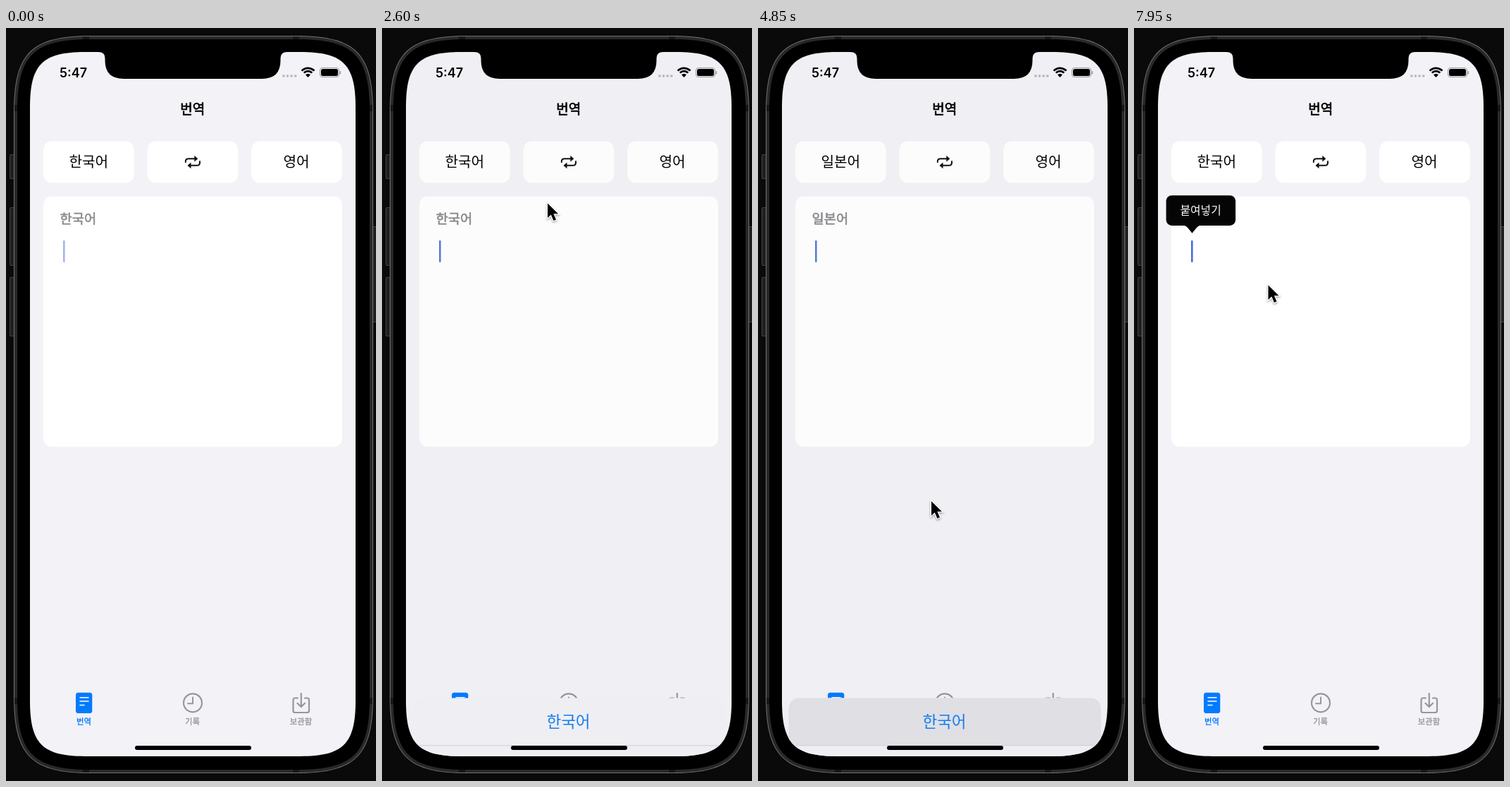
An HTML page with a canvas that plays this animation: 525 px wide and 1067 px high, repeating every 8 s.

```html
<!DOCTYPE html>
<html lang="ko">
<head>
<meta charset="utf-8">
<title>번역</title>
<style>
html, body { margin: 0; width: 100%; height: 100%; overflow: hidden; background: #0a0a0a; }
canvas { display: block; width: 525px; height: 1067px; }
</style>
</head>
<body>
<canvas id="stage" width="525" height="1067"></canvas>
<script>
const ctx = document.getElementById('stage').getContext('2d');
const LOOP = 8000, STEP = 50;
const HANGUL = '"Noto Sans CJK KR", "Noto Sans CJK", sans-serif';
const LATIN = 'Inter, sans-serif';
const BLUE = '#007aff', GRAY = '#96969b', INK = '#000';
const ROWS = ['한국어', '영어', '일본어', '중국어'];
const ROW_HEIGHT = 67.8, SHEET_TOP = 645;

const dialogs = [
  { open: 1250, close: 2500, pick: 2 },
  { open: 3550, close: 4750, pick: 0 }
];
const moves = [
  { from: 450, to: 850, x: 85, y: 190 },
  { from: 1700, to: 1750, x: 216, y: 612 },
  { from: 1750, to: 2400, x: 212, y: 808 },
  { from: 2500, to: 2600, x: 234, y: 246 },
  { from: 2600, to: 3250, x: 104, y: 180 },
  { from: 3700, to: 4250, x: 235, y: 720 },
  { from: 4250, to: 4600, x: 245, y: 668 },
  { from: 4900, to: 5400, x: 295, y: 250 },
  { from: 5400, to: 5700, x: 264, y: 185 },
  { from: 7050, to: 7600, x: 189.5, y: 362 }
];

const clamp = v => Math.max(0, Math.min(1, v));
const smooth = p => p * p * (3 - 2 * p);
const within = (t, from, to) => t >= from && t < to;

function mouseAt(t) {
  let x = -10, y = 215;
  for (const move of moves) {
    const p = smooth(clamp((t - move.from) / (move.to - move.from)));
    x += (move.x - x) * p;
    y += (move.y - y) * p;
  }
  return [x, y];
}

// The sheet settles exponentially and leaves with growing speed.
function sheetOffset({ open, close }, t) {
  return t < close
    ? 123.5 * 0.18 ** ((t - open) / STEP)
    : 47 * ((t - close) / STEP + 1) ** 1.7;
}

// The caret blinks from the start, and anew after each dialog.
function caretAlpha(t) {
  if (dialogs.some(d => within(t, d.open, d.close + 50))) return 0;
  const last = dialogs.filter(d => t >= d.close).pop();
  const since = last ? t - last.close - 60 : t + 377;
  return clamp(0.5 + 1.2 * Math.sin(since / 755 * Math.PI * 2));
}

function box(x, y, w, h, r, color) {
  ctx.beginPath();
  ctx.roundRect(x, y, w, h, r);
  ctx.fillStyle = color;
  ctx.fill();
}

function squircle(x, y, w, h, r) {
  const e = r * 1.4, k = e * 0.225, right = x + w, bottom = y + h;
  const path = new Path2D();
  path.moveTo(x, y + e);
  path.bezierCurveTo(x, y + k, x + k, y, x + e, y);
  path.lineTo(right - e, y);
  path.bezierCurveTo(right - k, y, right, y + k, right, y + e);
  path.lineTo(right, bottom - e);
  path.bezierCurveTo(right, bottom - k, right - k, bottom, right - e, bottom);
  path.lineTo(x + e, bottom);
  path.bezierCurveTo(x + k, bottom, x, bottom - k, x, bottom - e);
  path.closePath();
  return path;
}

function fill(path, color) {
  ctx.fillStyle = color;
  ctx.fill(new Path2D(path));
}

function stroke(path, color, width) {
  ctx.strokeStyle = color;
  ctx.lineWidth = width;
  ctx.lineCap = ctx.lineJoin = 'round';
  ctx.stroke(new Path2D(path));
}

function text(str, x, cy, size, color, { align = 'center', heavy = 0 } = {}) {
  ctx.font = `400 ${size}px ${HANGUL}`;
  ctx.textAlign = align;
  ctx.fillStyle = ctx.strokeStyle = color;
  ctx.fillText(str, x, cy + size * 0.375);
  if (heavy) {
    ctx.lineWidth = heavy;
    ctx.lineJoin = 'round';
    ctx.strokeText(str, x, cy + size * 0.375);
  }
}

function drawPhone() {
  ctx.fillStyle = '#0a0a0a';
  ctx.fillRect(0, 0, 525, 1067);
  for (const [x, y, h] of [[5, 179, 35], [5, 254, 83], [5, 353, 84], [519, 281, 136]]) {
    box(x, y, 8, h, 2, '#424242');
    box(x + 1, y + 1, 6, h - 2, 1, '#202020');
  }
  fill(squircle(11, 11, 510, 1045, 78), '#727272');
  fill(squircle(12, 12, 508, 1043, 77), '#292929');
  ctx.fillStyle = '#171717';
  for (const x of [109, 407]) for (const y of [12, 1050]) ctx.fillRect(x, y, 9, 5);
  for (const x of [12, 515]) for (const y of [109, 949]) ctx.fillRect(x, y, 5, 9);
  fill(squircle(16, 16, 500, 1035, 73), INK);
}

function drawStatus() {
  ctx.font = `600 18px ${LATIN}`;
  ctx.textAlign = 'left';
  ctx.fillStyle = INK;
  ctx.fillText('5:47', 76, 69.6);
  for (let i = 0; i < 4; i++) box(392 + i * 5.6, 66, 3.8, 3.8, 1.9, '#bdbdc2');
  ctx.strokeStyle = INK;
  ctx.lineCap = 'butt';
  ctx.lineWidth = 2.7;
  for (const r of [12.2, 7.8]) {
    ctx.beginPath();
    ctx.arc(428.5, 69, r, -Math.PI * 0.76, -Math.PI * 0.24);
    ctx.stroke();
  }
  fill('M428.5 70L425 66.2Q428.5 63.2 432 66.2Z', INK);
  ctx.beginPath();
  ctx.roundRect(445.5, 56.5, 27, 13, 4);
  ctx.strokeStyle = '#9a9a9f';
  ctx.lineWidth = 1.1;
  ctx.stroke();
  box(447, 58, 24, 10, 2.5, INK);
  box(473.5, 61, 1.6, 4.5, 1, '#9a9a9f');
}

function drawTabs() {
  box(99, 941.7, 23.3, 29.3, 3.5, BLUE);
  stroke('M105 948.7H117M105 954H117M105 959.5H111', '#fff', 1.6);
  ctx.beginPath();
  ctx.arc(265, 956.3, 13, 0, Math.PI * 2);
  ctx.strokeStyle = GRAY;
  ctx.lineWidth = 2.2;
  ctx.stroke();
  stroke('M265 948.5V957.3H258', GRAY, 2);
  stroke('M414 949.5H410Q407.5 949.5 407.5 952V967.5Q407.5 970 410 970H427.5Q430 970 430 967.5V952Q430 949.5 427.5 949.5H424', GRAY, 2.2);
  stroke('M418.8 943V961.5M413.5 956.8L418.8 962L424 956.8', GRAY, 2.2);
  text('번역', 110.5, 983, 11.4, BLUE, { heavy: 0.3 });
  text('기록', 264.5, 983, 11.4, GRAY, { heavy: 0.3 });
  text('보관함', 418.5, 983, 11.4, GRAY, { heavy: 0.3 });
}

function drawApp(t) {
  const swapped = within(t, 5900, 6800);
  const pressed = within(t, 5850, 5950) || within(t, 6750, 6850);
  const picked = dialogs.filter(d => t >= d.close + 200).pop();
  const chosen = ROWS[picked ? picked.pick : 0];
  const [source, result] = swapped ? ['영어', chosen] : [chosen, '영어'];

  ctx.fillStyle = '#f2f2f7';
  ctx.fillRect(34, 34, 462, 998);
  drawStatus();
  text('번역', 264.7, 115, 19, INK, { heavy: 0.7 });
  for (let i = 0; i < 3; i++) box(53 + i * 147.6, 160.5, 128.7, 59, 12, '#fff');
  text(source, 117.3, 189, 20.2, INK);
  text(result, 412, 189, 20.2, INK);

  ctx.globalAlpha = pressed ? 0.35 : 1;
  stroke('M254.8 190V189.3Q254.8 185.2 259 185.2H268M275 189V190.7Q275 194.8 270.8 194.8H262', '#111', 2);
  fill('M267.3 180.8L272.3 185.2L267.3 189.6ZM262.5 190.4L257.5 194.8L262.5 199.2Z', '#111');
  ctx.globalAlpha = 1;

  box(53, 238.5, 424, 355, 12, '#fff');
  text(source, 76.5, 270, 18.7, '#8a8a8e', { align: 'left', heavy: 0.6 });
  ctx.globalAlpha = caretAlpha(t);
  box(81, 301, 2.6, 31, 1, '#456fd8');
  ctx.globalAlpha = 1;
  drawTabs();
}

function drawSheet(dialog, t) {
  if (!within(t, dialog.open, dialog.close + 150)) return;
  const offset = sheetOffset(dialog, t);
  const held = t >= dialog.close - 150;
  const blue = '#147cf0';

  ctx.fillStyle = `rgba(0,0,0,${0.2 * Math.max(0.05, 1 - offset / 247)})`;
  ctx.fillRect(34, 34, 462, 998);
  ctx.save();
  ctx.translate(0, offset);
  ctx.save();
  ctx.beginPath();
  ctx.roundRect(43.5, SHEET_TOP, 443, 270, 15);
  ctx.clip();
  ctx.fillStyle = '#efeff3';
  ctx.fillRect(43, SHEET_TOP, 444, 270);
  ROWS.forEach((name, i) => {
    const y = SHEET_TOP + i * ROW_HEIGHT;
    if (held && i === dialog.pick) {
      ctx.fillStyle = '#e0e0e4';
      ctx.fillRect(43, y, 444, ROW_HEIGHT);
    }
    if (i) {
      ctx.fillStyle = '#d0d0d5';
      ctx.fillRect(43, Math.round(y) - 1, 444, 1);
    }
    text(name, 264.5, y + 33, 22.5, blue);
  });
  ctx.restore();
  box(43.5, 925, 443, 67, 15, '#fff');
  text('취소', 264.5, 958, 23, blue, { heavy: 0.7 });
  ctx.restore();
}

function drawPopover(t) {
  ctx.globalAlpha = clamp((t - 7800) / 120);
  box(45.6, 237.2, 98.5, 42.7, 8, '#050505');
  fill('M70 279.5H94Q91 280 88 284L82.5 290.7L77 284Q74 280 70 279.5Z', '#050505');
  text('붙여넣기', 94.6, 258, 15.8, '#fff');
  ctx.globalAlpha = 1;
}

function drawMouse(t) {
  const [x, y] = mouseAt(t);
  const arrow = new Path2D('M1 2.5V23L5.8 18.5L9.4 27L13 25.4L9.4 17.2H16Z');
  ctx.save();
  ctx.translate(x, y);
  ctx.shadowColor = 'rgba(0,0,0,.35)';
  ctx.shadowBlur = 3;
  ctx.shadowOffsetY = 1.5;
  ctx.strokeStyle = '#fff';
  ctx.lineWidth = 2.6;
  ctx.lineJoin = 'miter';
  ctx.stroke(arrow);
  ctx.shadowColor = 'transparent';
  ctx.fillStyle = INK;
  ctx.fill(arrow);
  ctx.restore();
}

function render(t) {
  drawPhone();
  ctx.save();
  ctx.clip(squircle(34, 34, 462, 998, 56));
  drawApp(t);
  for (const dialog of dialogs) drawSheet(dialog, t);
  box(183, 1017, 165, 6, 3, INK);
  fill('M131 33V34Q140.5 34 140.5 43V46Q140.5 72 167 72H363Q389.5 72 389.5 46V43Q389.5 34 399 34V33Z', INK);
  ctx.restore();
  drawPopover(t);
  if (t >= moves[0].from) drawMouse(t);
}

const start = performance.now();
function frame() {
  const t = (performance.now() - start) % LOOP;
  render(Math.floor(t / STEP) * STEP);
  requestAnimationFrame(frame);
}
frame();
</script>
</body>
</html>
```
